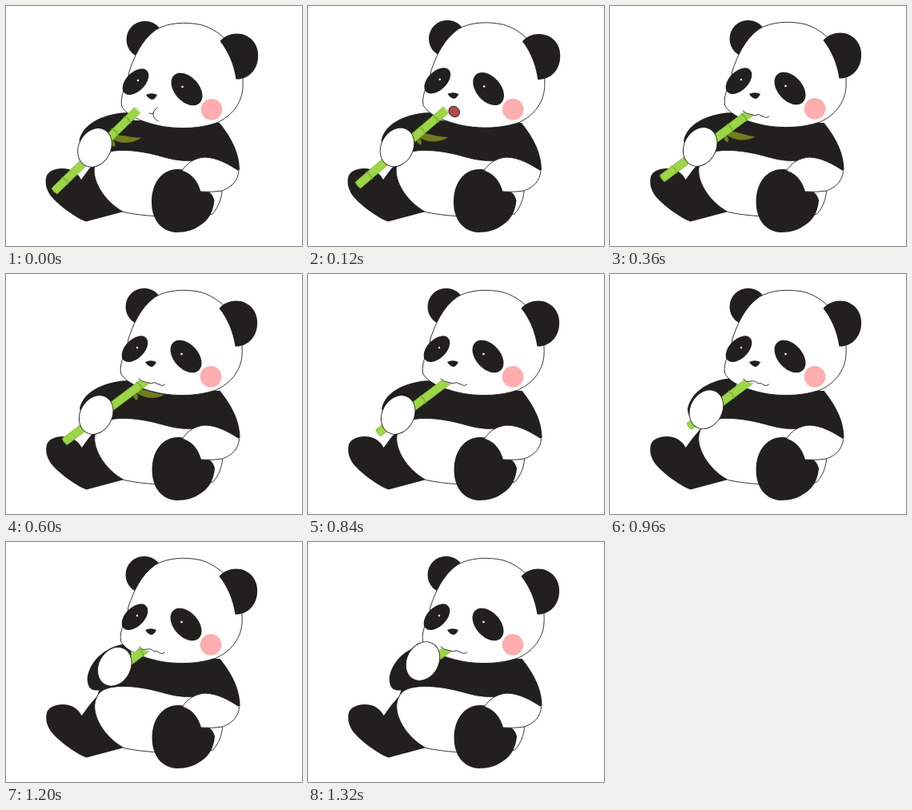
Animation of 370 by 300 pixels, one loop 1.44 s. Source, as an HTML page:

```html
<!DOCTYPE html>
<html>
<head>
<meta charset="utf-8">
<style>
  html, body { margin: 0; width: 100%; height: 100%; overflow: hidden; background: #fff; }
  svg { display: block; width: 100%; height: 100%; }
  .dark { fill: #22201f; }
  .skin { fill: #fff; stroke: #22201f; stroke-width: .9; }
  .line { fill: none; stroke: #22201f; stroke-width: .9; stroke-linecap: round; }
</style>
</head>
<body>
<svg viewBox="0 0 370 300">
  <clipPath id="bite"><path d="M0 131H165Q172 136 180 136.500V300H0Z"/></clipPath>

  <g id="body">
    <path class="dark" d="M50 215C52 202 75 200 85 207Q91 211 94 217Q102 205 113 193L150 238 147 257 100 269.500C85 264 62 246 55 236C50 228 49 222 50 215Z"/>
    <path class="dark" d="M130 142L267 146C283 166 292 185 292 205L250 204 200 215 125 215 111 200Z"/>
    <path id="arm" class="dark"/>
    <path class="skin" d="M118 187C130 177 165 179 198 189Q222 196 243 192L270 232C269 241 266 251 258 260C235 265 180 265 147 257.500C123 245 104 215 112 196Q114 190 118 187Z"/>
    <path class="dark" d="M182 245C182 220 196 204 214 204C230 204 240 213 245 230Q257 230 260.500 243C259 257 254 267 243 274C235 280 225 283 213 283C194 282 182 267 182 245Z"/>
    <path class="skin" d="M220 206C226 196 236 190 248 189C263 189 279 198 291 206C290 218 283 226 270 231Q258 233 243 232C239 218 232 210 220 206Z"/>
  </g>

  <g id="leaf" fill="#6f7d1c">
    <path d="M93 2C100 2 105 8 112 18Q118 25 121 28C109 26 97 18 93 2Z"/>
    <path d="M93 2Q85 6 89 13Q95 11 93 2Z"/>
  </g>

  <g id="head">
    <circle class="dark" cx="173.700" cy="42" r="23.200"/>
    <path class="skin" d="M144.500 125C142 110 153 96 154 82C160 64 169 43 187 30C202 20.500 225 19.500 244 23.500C263 29 278 42 286 58C294 72 297 88 296 102C295 122 281 139 262 146.500C242 153 220 154 199 151C181 148 152 140 144.500 125Z"/>
    <path class="dark" d="M267.500 44C275 35 289 32 300 37C311 42 316 53 315 65C314 80 303 92 287.500 91.500C285 74 278 57 267.500 44Z"/>
    <ellipse class="dark" rx="19.800" ry="11.800" transform="translate(162 94.700)rotate(-45)"/>
    <ellipse class="dark" rx="23.700" ry="15.300" transform="translate(226 104)rotate(48)"/>
    <circle cx="165" cy="93" r="1.200" fill="#fff"/>
    <circle cx="220.500" cy="101" r="1.300" fill="#fff"/>
    <path class="dark" d="M175 111Q182 107.500 189 111Q186 117 182.500 117Q178 116 175 111Z"/>
    <circle cx="257" cy="129.300" r="13.300" fill="#ffadae"/>
  </g>

  <ellipse id="gape" fill="#b24b4b" stroke="#22201f" stroke-width=".9"/>
  <g id="biteBox"><g id="stalk">
    <path id="cane" fill="none" stroke="#9cd545" stroke-width="10"/>
    <path id="edge" fill="none" stroke="#82bd35" stroke-width=".8"/>
    <path id="nodes" fill="none" stroke="#76b02f" stroke-width="1.500" stroke-linecap="round"/>
  </g></g>
  <path id="mouth" class="line"/>
  <ellipse id="hand" class="skin" rx="20" ry="25.400"/>
</svg>
<script>
const $ = id => document.getElementById(id);
const set = (id, name, value) => $(id).setAttribute(name, value);
const mix = (a, b, t) => a + (b - a) * t;

const STEP = 120, STEPS = 12;
const SMILE = "M189 127C182 132 182 139 190 144M179 134Q183 136 185 133.500";
const CHEW = [
  "M167 131Q169 136 176 134Q182 133 185 137Q189 135 191 138Q195 141 198.500 138",
  "M166 131Q170 135 176 135.500Q182 138 186 135.500Q189 138 192 138Q195 141 198.500 138"
];
const CUTS = [0, 5, 10, 19, 28, 42, 57, 72, 88];
const ARM_DOWN = [158, 133, 130, 132, 96, 144, 91.5, 168, 95, 187, 112, 196, 128, 190];
const ARM_UP = [152, 127, 125, 129, 104, 148, 101, 170, 101, 188, 112, 190, 135, 178];

function stalk(x, y, angle, cut, slide, end) {
  const place = `translate(${x} ${y})rotate(${angle})`;
  set("stalk", "transform", place);
  set("leaf", "transform", `${place}translate(${slide} 0)`);
  set("cane", "d", `M${cut - 4} 0H${end}`);
  set("edge", "d", `M${cut - 2} -5Q${cut - 7} 0 ${cut - 2} 5H${end}Q${end + 3} 0 ${end} -5Z`);
  set("nodes", "d", [15, 52, 102, 124].map(n => n + slide)
    .filter(n => n > cut + 3 && n < end)
    .map(n => `M${n} -5.500Q${n + 3} 0 ${n} 5.500`).join(""));
}

function draw(k) {
  const chewing = k > 2;
  const open = chewing ? 0 : k / 2;
  const lift = Math.max(0, (k - 7) / 4);

  set("body", "transform", `translate(${chewing ? .6 : 0} 0)`);
  set("head", "transform", chewing ? "translate(-1 -1)"
    : `translate(0 ${-.6 * open})rotate(${1.6 * open} 235 75)`);

  if (chewing) stalk(68, 213.5, -36.8, CUTS[k - 3], (k - 3) * 10.5, 146);
  else stalk(mix(63, 67, open), mix(229, 214.5, open), mix(-44.3, -36.8, open), 0, 0, 141);
  set("biteBox", "clip-path", chewing ? "url(#bite)" : "none");
  set("leaf", "visibility", k < 7 ? "visible" : "hidden");

  set("gape", "rx", 14.5 * open);
  set("gape", "ry", 12.5 * open);
  set("gape", "transform", `translate(${mix(184, 181.5, open)} 132)rotate(40)`);
  set("gape", "visibility", open ? "visible" : "hidden");
  set("mouth", "d", chewing ? CHEW[k % 2] : open ? "" : SMILE);

  const p = ARM_DOWN.map((a, i) => mix(a, ARM_UP[i], Math.min(1, lift * 2)));
  set("arm", "d", `M${p.slice(0, 2)}C${p.slice(2, 8)}C${p.slice(8)}L165 165Z`);
  const handX = chewing ? 112.7 : mix(111, 112, open);
  const handY = chewing ? 176 : 177 - open;
  set("hand", "transform",
    `translate(${mix(handX, 143.5, lift)} ${mix(handY, 149, lift)})rotate(28)`);
}

function tick() {
  draw(Math.floor(performance.now() / STEP) % STEPS);
  requestAnimationFrame(tick);
}
tick();
</script>
</body>
</html>
```
